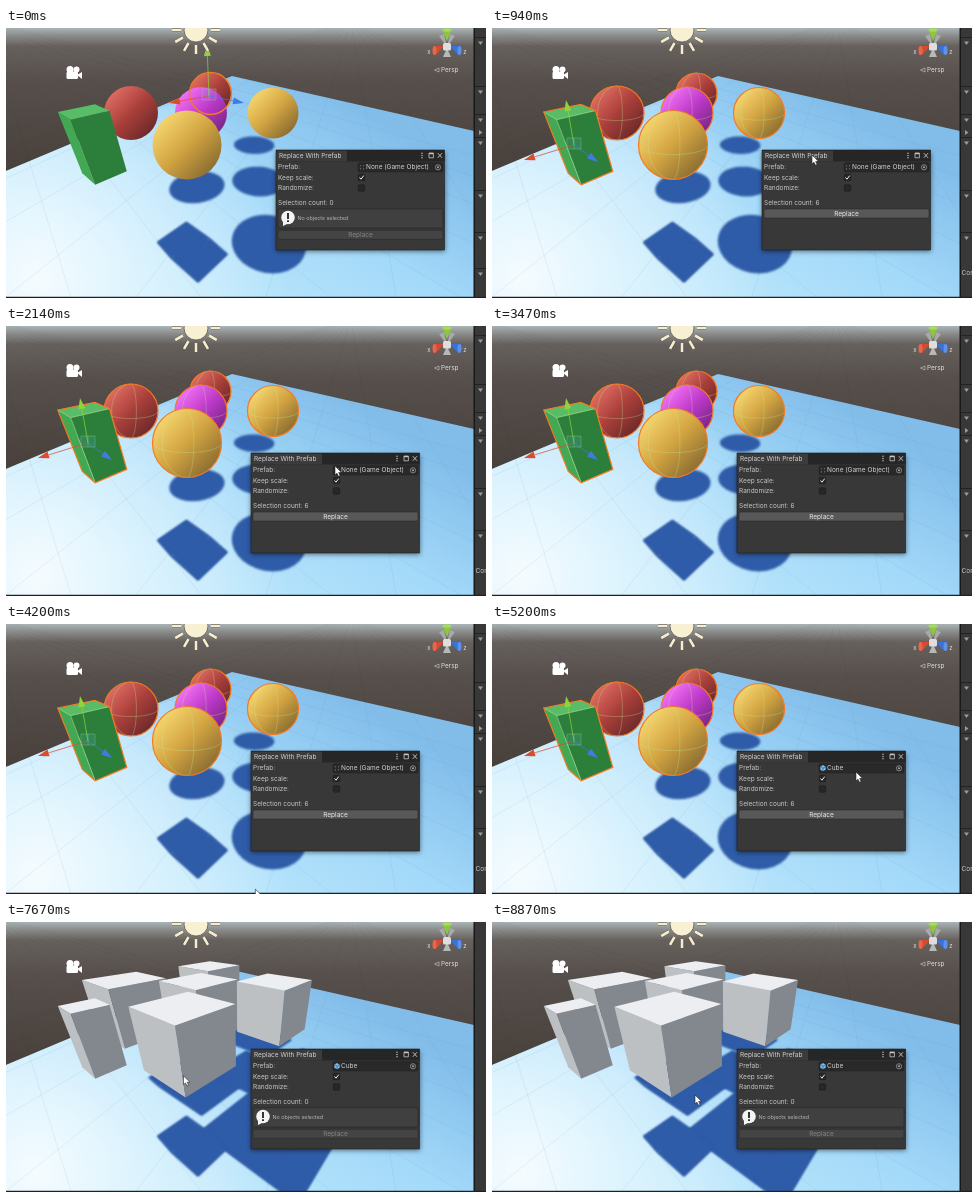
Animation, 480 px wide and 270 px high, one loop 8.94 s. Source, as an HTML page with a canvas:

```html
<!DOCTYPE html>
<html lang="en">
<head>
<meta charset="utf-8">
<title>Replace With Prefab</title>
<style>
html, body { margin: 0; width: 100%; height: 100%; overflow: hidden; background: #383838; }
canvas { display: block; width: 480px; height: 270px; }
</style>
</head>
<body>
<canvas id="stage"></canvas>
<script>
const LOOP = 8940;
const SELECT_ALL = 270, ASSIGN = 4760, PRESS = 6740, REPLACE = 7000;
const ORANGE = '#f47a22', WIRE = 'rgba(190,235,150,.6)', LABEL = '#c8c8c8';

const canvas = document.getElementById('stage');
const ratio = window.devicePixelRatio || 1;
canvas.width = 480 * ratio;
canvas.height = 270 * ratio;
const ctx = canvas.getContext('2d');

// ---- Motion: eased steps between a few places ----
const cursorStops = [
  { t: 330, x: -20, y: 150 }, { t: 860, x: 320, y: 127 }, { t: 1000, x: 320, y: 127 },
  { t: 1750, x: 295, y: 132 }, { t: 2080, x: 329, y: 140 }, { t: 2240, x: 329, y: 140 },
  { t: 2780, x: 225, y: 290 }, { t: 3860, x: 225, y: 290 }, { t: 5140, x: 364, y: 148 },
  { t: 5700, x: 364, y: 148 }, { t: 6480, x: 291, y: 191 }, { t: 7160, x: 291, y: 191 },
  { t: 8050, x: 105, y: 130 }, { t: 8780, x: 203, y: 173 }
];
const windowStops = [{ t: 1000, x: 270, y: 122 }, { t: 1750, x: 245, y: 127 }];

function place(stops, t) {
  const next = stops.findIndex(s => s.t > t);
  if (next < 1) return next ? stops.at(-1) : stops[0];
  const a = stops[next - 1], b = stops[next];
  const u = (t - a.t) / (b.t - a.t), k = u * u * (3 - 2 * u);
  return { x: a.x + (b.x - a.x) * k, y: a.y + (b.y - a.y) * k };
}

// ---- Drawing helpers ----
function paint(fill, stroke, width = 1) {
  if (fill) { ctx.fillStyle = fill; ctx.fill(); }
  if (stroke) { ctx.strokeStyle = stroke; ctx.lineWidth = width; ctx.stroke(); }
}

function rect(x, y, w, h, fill, stroke, width, radius = 0) {
  ctx.beginPath();
  ctx.roundRect(x, y, w, h, radius);
  paint(fill, stroke, width);
}

function poly(points, fill, stroke, width) {
  ctx.beginPath();
  for (const p of points) ctx.lineTo(...p);
  ctx.closePath();
  paint(fill, stroke, width);
}

function line(x1, y1, x2, y2, color, width = 1) {
  ctx.beginPath();
  ctx.moveTo(x1, y1);
  ctx.lineTo(x2, y2);
  paint(null, color, width);
}

function ellipse(x, y, rx, ry, fill, stroke, width, from = 0, to = Math.PI * 2) {
  ctx.beginPath();
  ctx.ellipse(x, y, rx, ry, 0, from, to);
  paint(fill, stroke, width);
}

function ring(count, radius, phase = 0) {
  return Array.from({ length: count }, (_, i) => {
    const a = phase + i * 2 * Math.PI / count;
    return [radius * Math.cos(a), radius * Math.sin(a)];
  });
}

function text(str, x, y, color = LABEL, size = 6.5, align = 'left') {
  ctx.font = `${size}px Inter, Roboto, sans-serif`;
  ctx.textAlign = align;
  ctx.textBaseline = 'middle';
  ctx.fillStyle = color;
  ctx.fillText(str, x, y);
}

function shade(gradient, ...stops) {
  stops.forEach(([at, color]) => gradient.addColorStop(at, color));
  return gradient;
}

// ---- Camera: pitched down 30 degrees, horizon at the top of the stage ----
const FOCAL = 234, CX = 234, CY = 135, COS = Math.cos(Math.PI / 6), SIN = .5;
const FLOOR = -2.26;

function project(x, y, z) {
  const depth = z * COS - y * SIN;
  return [CX + FOCAL * x / depth, CY - FOCAL * (y * COS + z * SIN) / depth];
}

// World centre of a unit sphere seen at (x, y) with radius r.
function locate({ x, y, r }) {
  const depth = FOCAL / 2 / r, up = (CY - y) * depth / FOCAL;
  return [(x - CX) * depth / FOCAL, up * COS - depth * SIN, up * SIN + depth * COS];
}

const red = ['#dc6a60', '#aa3f3a', '#6e2b2b'];
const yellow = ['#f4d36c', '#d2a442', '#8e7032'];
const magenta = ['#f06ff2', '#be3ac9', '#7c268a'];
const green = ['#58bd66', '#43a853', '#2c7f3b'];
const white = ['#eceef2', '#bdc0c3', '#83888f'];

// Far to near; a width marks the narrow box.
const objects = [
  { x: 204.5, y: 65.5, r: 20.5, tones: red },
  { x: 125, y: 85, r: 27, tones: red },
  { x: 195, y: 85, r: 26, tones: magenta },
  { x: 267, y: 85, r: 25.5, tones: yellow },
  { x: 181, y: 117, r: 34.5, tones: yellow },
  { x: 89, y: 116, r: 36, tones: green, width: .45, height: .93 }
];

// Top and base rings, each in the order front, right, back, left.
function boxRings(object, place) {
  const { width = 1, height = 1 } = object;
  const corners = ring(4, width * Math.SQRT1_2, .09 - Math.PI / 2);
  return [height / 2, -height / 2].map(dy => corners.map(([dx, dz]) => place(dx, dy, dz)));
}

function drawShadow(object, asBox) {
  const [x, , z] = locate(object);
  const sx = x + 1.75 - object.x * .0035, sz = z - 1.05;
  const cast = (dx, dy, dz) => project(sx + dx + dy * .25, FLOOR, sz + dz - dy * .25);
  const color = '#2f5ca8';
  if (!asBox) return poly(ring(32, .45).map(([dx, dz]) => cast(dx, 0, dz)), color);
  const [top, base] = boxRings(object, cast);
  poly(top, color);
  poly(base, color);
  top.forEach((p, i) => poly([p, top[(i + 1) % 4], base[(i + 1) % 4], base[i]], color));
}

function drawBox(object, [topTone, leftTone, rightTone], selected) {
  const [x, y, z] = locate(object);
  const [top, base] = boxRings(object, (dx, dy, dz) => project(x + dx, y + dy, z + dz));
  const [front, right, back, left] = top;
  poly([left, front, base[0], base[3]], leftTone);
  poly([front, right, base[1], base[0]], rightTone);
  poly(top, topTone);
  if (!selected) return;
  poly([left, front, right, front, base[0], front], null, WIRE, .5);
  poly([left, back, right, base[1], base[0], base[3]], null, ORANGE, 1.2);
}

function drawSphere({ x, y, r, tones: [light, mid, dark] }, selected) {
  const k = r * .7;
  const fill = ctx.createLinearGradient(x - k, y - k, x + k, y + k);
  ellipse(x, y, r, r, shade(fill, [0, light], [.5, mid], [1, dark]));
  if (!selected) return;
  ellipse(x, y, r, r * .28, null, WIRE, .5, 0, Math.PI);
  ellipse(x, y, r * .2, r, null, WIRE, .5, -Math.PI / 2, Math.PI / 2);
  ellipse(x, y, r * .72, r, null, WIRE, .5, Math.PI / 2, Math.PI * 1.5);
  ellipse(x, y, r, r, null, ORANGE, 1.2);
}

function drawObjects(t) {
  const all = t >= SELECT_ALL, replaced = t >= REPLACE;
  ctx.filter = 'blur(1.1px)';
  objects.forEach(o => drawShadow(o, replaced || o.width));
  ctx.filter = 'none';
  for (const o of objects) {
    if (replaced) drawBox(o, white);
    else if (o.width) drawBox(o, o.tones, all);
    else drawSphere(o, all);
  }
  if (replaced) return;
  if (all) return drawMoveHandle([82, 117], [74, 72], [32, 132], [106, 134]);
  ellipse(204.5, 65.5, 21, 21, null, ORANGE, 1.4);
  drawMoveHandle([203, 68], [201, 17], [163, 75], [238, 75]);
}

function drawMoveHandle([x, y], ...tips) {
  const colors = ['#8fd43c', '#dc4b2c', '#3f7be0'];
  tips.forEach(([tx, ty], i) => {
    const d = Math.hypot(tx - x, ty - y), ux = (tx - x) / d, uy = (ty - y) / d;
    const bx = tx - ux * 11, by = ty - uy * 11;
    line(x, y, bx, by, colors[i], .7);
    poly([[tx, ty], [bx - uy * 3.5, by + ux * 3.5], [bx + uy * 3.5, by - ux * 3.5]], colors[i]);
  });
  rect(x - 7, y - 7, 14, 11, 'rgba(90,190,200,.15)', 'rgba(150,215,190,.6)', .5);
  line(x, y - 7, x, y + 4, 'rgba(150,215,190,.6)', .5);
}

// ---- Scene ----
function gridLines(color) {
  for (let i = -4; i < 8; i++) {
    line(345, -7, i * 130, 269, color, .5);
    line(-20, -8, i * 130 + 65, 269, color, .5);
  }
}

function drawGround() {
  const sky = ctx.createLinearGradient(0, 0, 0, 150);
  rect(0, 0, 468, 270, shade(sky, [0, '#aab4b7'], [.05, '#8b8d8c'], [.12, '#67615e'], [.35, '#564f4b'], [1, '#463f3a']));
  gridLines('rgba(30,25,20,.08)');

  const plane = [[0, 143], [226, 48], [468, 103], [468, 270], [0, 270]];
  const blue = ctx.createLinearGradient(300, 50, 170, 270);
  const glare = ctx.createRadialGradient(30, 250, 0, 30, 250, 250);
  poly(plane, shade(blue, [0, '#82bdea'], [.45, '#a3d9f9'], [1, '#bfe9fc']));
  poly(plane, shade(glare, [0, 'rgba(255,255,255,.85)'], [.45, 'rgba(245,252,255,.5)'], [1, 'rgba(255,255,255,0)']));
  ctx.save();
  ctx.clip();
  gridLines('rgba(90,140,180,.22)');
  ctx.restore();
}

function drawSceneIcons() {
  const inner = ring(12, 15), outer = ring(12, 24);
  for (const [color, width] of [['#50483c', 3.6], ['#f5edcf', 2.6]]) {
    inner.forEach(([x, y], i) => line(190 + x, 2 + y, 190 + outer[i][0], 2 + outer[i][1], color, width));
  }
  ellipse(190, 2, 12, 12, '#f8f0d2', '#50483c', .7);

  ellipse(64, 41.5, 3.5, 3.5, '#fff');
  ellipse(70.5, 41.5, 3, 3, '#fff');
  rect(60.5, 43.5, 11.5, 7.5, '#fff', null, 0, 1.5);
  poly([[71, 47], [76, 44], [76, 51]], '#fff');

  // Orientation axes: grey back cones, then a coloured cone for each axis
  for (const side of [-1, 1]) {
    poly([[441, 19], [441 + side * 8, 8], [441 + side * 3, 6]], '#a9a9a9');
    poly([[441 + side * 3, 18], [441 + side * 14, 18], [441 + side * 11, 27]], side < 0 ? '#d64a32' : '#3a72d8');
    ellipse(441 + side * 12.5, 22.5, 2, 4.5, side < 0 ? '#e8674c' : '#5c92ec');
    text(side < 0 ? 'x' : 'z', 441 + side * 18, 24, '#ddd', 6, 'center');
  }
  poly([[441, 20], [437, 29], [445, 29]], '#b8b8b8');
  poly([[441, 13], [436.5, 2], [445.5, 2]], '#8dc63f');
  ellipse(441, 2, 4.5, 1.7, '#a6dc58');
  rect(437, 15, 8, 7.5, '#dedede', null, 0, 1.5);
  poly([[428.5, 42], [433, 40], [433, 44]], null, '#ccc', .6);
  text('Persp', 435, 42.3, '#ddd', 6.4);
}

function drawInspector(t) {
  rect(468, 0, 12, 270, '#383838');
  rect(467.5, 0, 1.5, 270, '#191919');
  rect(0, 268.7, 480, 1.3, '#202020');
  if (t >= REPLACE) return;
  const all = t >= SELECT_ALL;
  for (const y of [15, 64, 92, 115, 168, 210, all ? 300 : 246]) {
    rect(469, y - 6, 11, .8, '#1e1e1e');
    poly([[472, y - 1.5], [477, y - 1.5], [474.5, y + 2]], '#9a9a9a');
  }
  poly([[473, 102], [476.5, 104.5], [473, 107]], '#9a9a9a');
  if (all) text('Con', 469.5, 245);
}

// ---- Editor window ----
function drawWindowFrame() {
  ctx.save();
  ctx.shadowColor = 'rgba(0,0,0,.5)';
  ctx.shadowBlur = 5 * ratio;
  ctx.shadowOffsetY = 1.5 * ratio;
  rect(0, 0, 168.5, 100, '#383838');
  ctx.restore();
  rect(0, 0, 168.5, 11.5, '#262626');
  rect(0, .5, 71, 11, '#3b3b3b');
  rect(0, 0, 168.5, 100, null, '#1f1f1f', .6);
  text('Replace With Prefab', 3, 6.5, '#d2d2d2');
  for (const y of [3.3, 5.5, 7.7]) ellipse(146, y, .7, .7, LABEL);
  rect(153, 3.2, 4.4, 4.6, null, LABEL, .8);
  rect(153, 2.8, 4.4, 1.4, LABEL);
  line(161.8, 3.2, 166, 7.8, LABEL, .9);
  line(166, 3.2, 161.8, 7.8, LABEL, .9);
}

function drawPrefabField(assigned) {
  rect(82, 12.7, 85, 9.2, '#292929', '#1e1e1e', .5, 1.5);
  if (assigned) {
    poly(ring(6, 3.1, Math.PI / 6).map(([x, y]) => [86 + x, 17.2 + y]), '#78bdf0');
    for (const [x, y] of ring(3, 2.8, Math.PI / 2)) line(86, 17.2, 86 + x, 17.2 + y, '#28506e', .6);
  } else {
    for (const [x, y] of ring(4, 2.2, Math.PI / 4)) ellipse(86 + x, 17.3 + y, .6, .6, '#888');
  }
  text(assigned ? 'Cube' : 'None (Game Object)', 90, 17.4, '#d0d0d0');
  ellipse(162, 17.3, 2.6, 2.6, null, '#aaa', .7);
  ellipse(162, 17.3, 1, 1, '#aaa');
}

function drawHelpBox() {
  rect(2, 58.8, 165, 19.2, '#404040', '#222', .6, 1.5);
  ellipse(12, 67.5, 6.8, 6.8, '#f4f4f4');
  poly([[7, 71], [7, 76], [13, 73]], '#f4f4f4');
  rect(11, 63, 2, 6, '#333');
  rect(11, 70.3, 2, 1.8, '#333');
  text('No objects selected', 21.5, 68.7, '#b8b8b8', 5.4);
}

function drawWindow(t) {
  const count = t >= SELECT_ALL && t < REPLACE ? 6 : 0;
  const pressed = t >= PRESS && t < REPLACE;
  const { x, y } = place(windowStops, t);
  ctx.save();
  ctx.translate(x, y);
  drawWindowFrame();
  ['Prefab:', 'Keep scale:', 'Randomize:'].forEach((label, i) => text(label, 2, 17.3 + i * 10.5));
  text('Selection count: ' + count, 2, 53.3);
  drawPrefabField(t >= ASSIGN);

  for (const top of [24.3, 34.8]) rect(82.3, top, 6.4, 6.4, '#272727', '#171717', .5, 1);
  line(83.5, 27.5, 85, 29.2, '#eee');
  line(85, 29.2, 87.7, 25.6, '#eee');

  if (!count) drawHelpBox();
  const top = count ? 59 : 80.3;
  rect(2, top, 165, 9, !count ? '#444' : pressed ? '#353535' : '#585858', '#292929', .6, 1.5);
  text('Replace', 84.5, top + 4.6, count ? '#ebebeb' : '#858585', 6.5, 'center');
  ctx.restore();
}

function drawCursor(t) {
  const { x, y } = place(cursorStops, t);
  const arrow = [[0, 0], [0, 9], [2, 7.2], [3.5, 10.3], [5.1, 9.6], [3.7, 6.5], [6.4, 6.3]];
  poly(arrow.map(([dx, dy]) => [x + dx, y + dy]), '#fff', '#222', .6);
}

function frame(now) {
  const t = now % LOOP;
  ctx.setTransform(ratio, 0, 0, ratio, 0, 0);
  drawGround();
  drawObjects(t);
  drawSceneIcons();
  drawInspector(t);
  drawWindow(t);
  drawCursor(t);
  requestAnimationFrame(frame);
}
requestAnimationFrame(frame);
</script>
</body>
</html>
```
